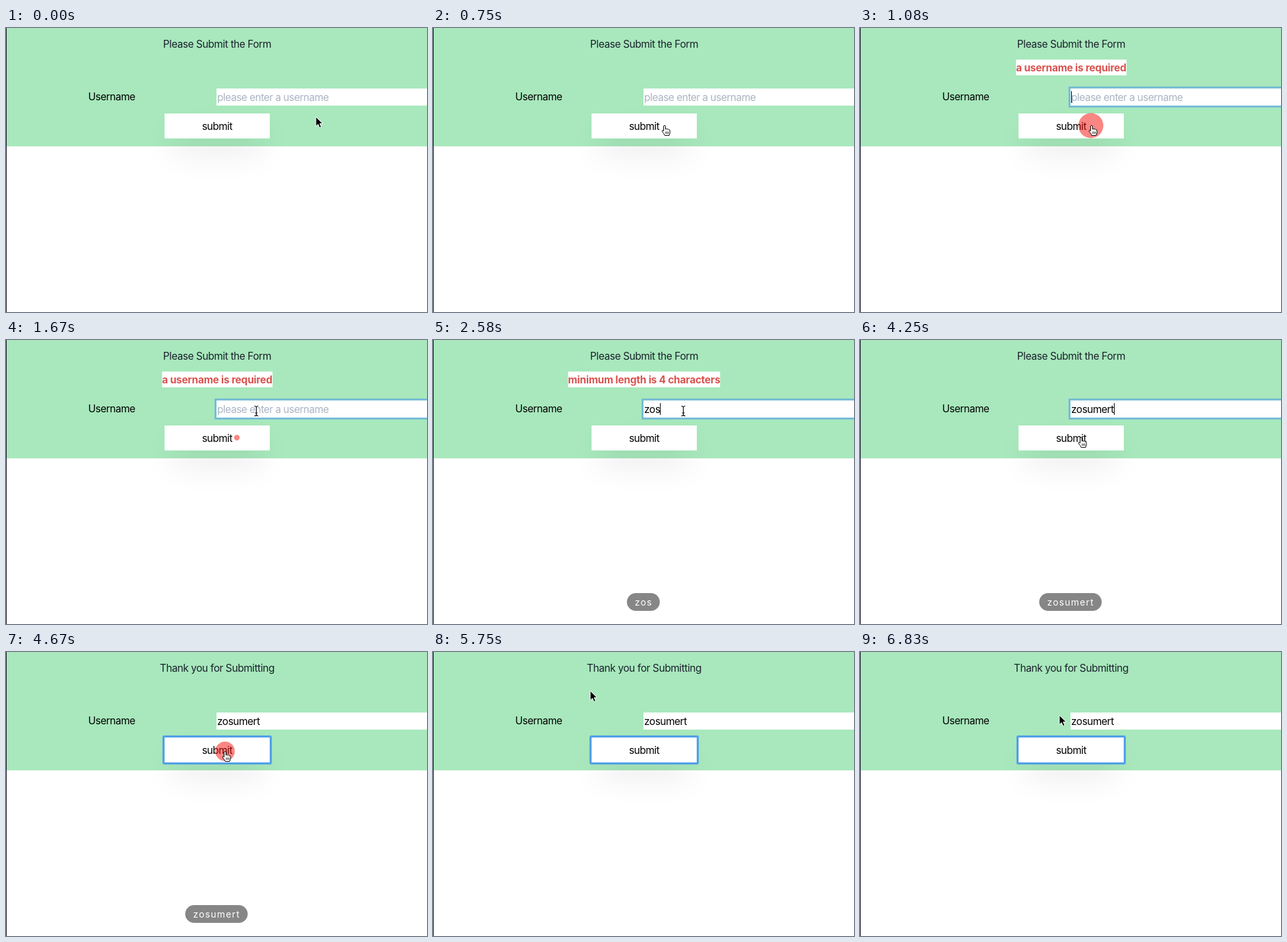
An HTML page that plays this animation: 640x432 px, repeating every 8 s.

```html
<!DOCTYPE html>
<html lang="en">
<head>
<meta charset="utf-8">
<title>Form validation</title>
<style>
  html, body { margin: 0; width: 100%; height: 100%; overflow: hidden; background: #fff; }
  #stage {
    position: relative; width: 640px; height: 432px; overflow: hidden;
    font: 15.5px/24px Inter, "Liberation Sans", sans-serif;
    letter-spacing: -0.5px; color: #000; white-space: nowrap;
  }
  #stage > * { position: absolute; }
  .panel { left: 0; top: 0; width: 640px; height: 180px; background: #a8e8bc; }
  .edge { left: 0; top: 0; width: 1px; height: 432px; background: #17142b; }
  .mid { left: 321px; transform: translateX(-50%); }
  #title { top: 13px; color: #1a202c; letter-spacing: -0.42px; }
  #error {
    top: 48px; height: 24px; line-height: 26px; background: #fff;
    color: #d9534f; font-weight: 700; letter-spacing: -0.23px;
  }
  .label { left: 125px; top: 93px; }
  #field { left: 320px; top: 92px; width: 330px; height: 26px; background: #fff; }
  #field.focus { box-shadow: 0 0 0 3px #78bcd7; }
  #field div { position: absolute; left: 1px; top: 2px; }
  #hint { color: #a9b4c2; }
  #caret { display: inline-block; width: 1px; height: 18px; margin-right: -1px; vertical-align: -3px; background: #000; }
  #submit {
    left: 241px; top: 130px; width: 160px; height: 38px; line-height: 40px;
    text-align: center; background: #fff;
    box-shadow: 0 25px 50px -12px rgba(0, 0, 0, .2);
  }
  #ring {
    left: 238px; top: 127px; width: 160px; height: 38px;
    border: 3px solid #529fe6; border-radius: 3px;
    box-shadow: inset 0 0 1px #529fe6, 0 0 1px #529fe6;
  }
  #keys {
    left: 320px; top: 385px; height: 27px; line-height: 27px; padding: 0 11.5px 0 12px;
    transform: translateX(-50%); border-radius: 14px;
    background: #868686; color: #fff; font-size: 14px; letter-spacing: 1.2px;
  }
  svg { left: 0; top: 0; }
</style>
</head>
<body>
<div id="stage">
  <div class="panel"></div>
  <div id="title" class="mid"></div>
  <div id="error" class="mid"></div>
  <div class="label">Username</div>
  <div id="field">
    <div id="hint">please enter a username</div>
    <div><span id="typed"></span><span id="caret"></span></div>
  </div>
  <div id="submit">submit</div>
  <div id="ring"></div>
  <div id="keys"></div>
  <div class="edge"></div>
  <svg width="640" height="432">
    <circle id="click" fill="#f50f0a" fill-opacity=".5"/>
    <g id="arrow">
      <path d="M0 0V14.5L3.4 11.4L5.7 16.7L8.3 15.6L6 10.4H10.4Z" fill="#000" stroke="#fff" stroke-width="1"/>
    </g>
    <g id="hand">
      <path d="M-1.4 0Q0-2 1.4 0V5Q2.6 3.6 4 5Q5.4 4 6.4 5.6Q8.2 5.2 8.2 7.4V10.5L7 14.4H.2Q-.8 11.6-3.4 8.8Q-4.4 6.6-2.8 6.6L-1.4 7.8Z" fill="#fff" stroke="#000" stroke-width="1" stroke-linejoin="round"/>
      <path d="M1.8 8.5V12M3.8 8.5V12M5.8 8.5V12" stroke="#000" stroke-width=".8"/>
    </g>
    <g id="beam" fill="none">
      <path d="M-2.5-7.5Q.5-7.5 .5-5.5Q.5-7.5 3.5-7.5M.5-5.5V5.5M-2.5 7.5Q.5 7.5 .5 5.5Q.5 7.5 3.5 7.5M-1.5 3H2.5" stroke="#fff" stroke-width="2.6"/>
      <path d="M-2.5-7.5Q.5-7.5 .5-5.5Q.5-7.5 3.5-7.5M.5-5.5V5.5M-2.5 7.5Q.5 7.5 .5 5.5Q.5 7.5 3.5 7.5M-1.5 3H2.5" stroke="#000" stroke-width="1.1"/>
    </g>
  </svg>
</div>
<script>
  const LOOP = 8000, STEP = 1000 / 12;
  const NAME = "zosumert";
  const KEY_TIMES = [2080, 2420, 2580, 2660, 2750, 3000, 3160, 3250];
  const FOCUS = 1080, SENT = 4410, KEYS_GONE = 5250;
  const CLICKS = [[910, 351, 148.5], [4330, 333, 151]];
  // Pointer path: time, x, y
  const PATH = [
    [330, 471, 135], [750, 352, 149], [1160, 352, 149], [1670, 380, 108],
    [3410, 380, 108], [3500, 371, 115], [4250, 336, 149], [4330, 333, 152],
    [4670, 333, 152], [5080, 286, 92], [5500, 242, 48], [5750, 239, 59],
    [5920, 269, 48], [6160, 290, 44], [6500, 308, 78], [6750, 303, 94], [6830, 303, 96]
  ];

  const el = id => document.getElementById(id);
  const show = (id, on) => { el(id).style.display = on ? "" : "none"; };
  const write = (id, s) => { if (el(id).textContent !== s) el(id).textContent = s; };
  const within = (x, y, l, t, r, b) => x >= l && x < r && y >= t && y < b;

  function pointerAt(t) {
    const i = PATH.findIndex(p => p[0] > t);
    if (i === 0) return PATH[0].slice(1);
    if (i < 0) return PATH[PATH.length - 1].slice(1);
    const [t0, x0, y0] = PATH[i - 1], [t1, x1, y1] = PATH[i];
    const u = (t - t0) / (t1 - t0), e = u * u * (3 - 2 * u);
    return [x0 + (x1 - x0) * e, y0 + (y1 - y0) * e];
  }

  function drawPointer(t) {
    const [x, y] = pointerAt(t).map(Math.round);
    const kind = within(x, y, 241, 130, 401, 168) ? "hand"
      : within(x, y, 320, 92, 640, 118) ? "beam" : "arrow";
    for (const id of ["arrow", "hand", "beam"]) show(id, id === kind);
    el(kind).setAttribute("transform", `translate(${x} ${y})`);
  }

  function drawClick(t) {
    const hit = CLICKS.find(c => t >= c[0] && t < c[0] + 10 * STEP);
    show("click", hit);
    if (!hit) return;
    el("click").setAttribute("cx", hit[1]);
    el("click").setAttribute("cy", hit[2]);
    el("click").setAttribute("r", 23.3 - 2.1 * (t - hit[0]) / STEP);
  }

  function draw(t) {
    const count = KEY_TIMES.filter(k => k <= t).length;
    const text = NAME.slice(0, count);
    const focused = t >= FOCUS && t < SENT;
    const lastKey = count ? KEY_TIMES[count - 1] : FOCUS;

    write("title", t < SENT ? "Please Submit the Form" : "Thank you for Submitting");
    write("error", count ? "minimum length is 4 characters" : "a username is required");
    show("error", t >= FOCUS && count < 4);
    write("typed", text);
    write("keys", text);
    show("hint", !count);
    show("keys", count && t < KEYS_GONE);
    show("caret", focused && Math.floor((t - lastKey) / 500) % 2 === 0);
    show("ring", t >= SENT);
    el("field").className = focused ? "focus" : "";
    drawClick(t);
    drawPointer(t);
  }

  const start = performance.now();
  function tick() {
    const t = (performance.now() - start) % LOOP;
    draw(Math.floor((t + 4) / STEP) * STEP);
    requestAnimationFrame(tick);
  }
  tick();
</script>
</body>
</html>
```
